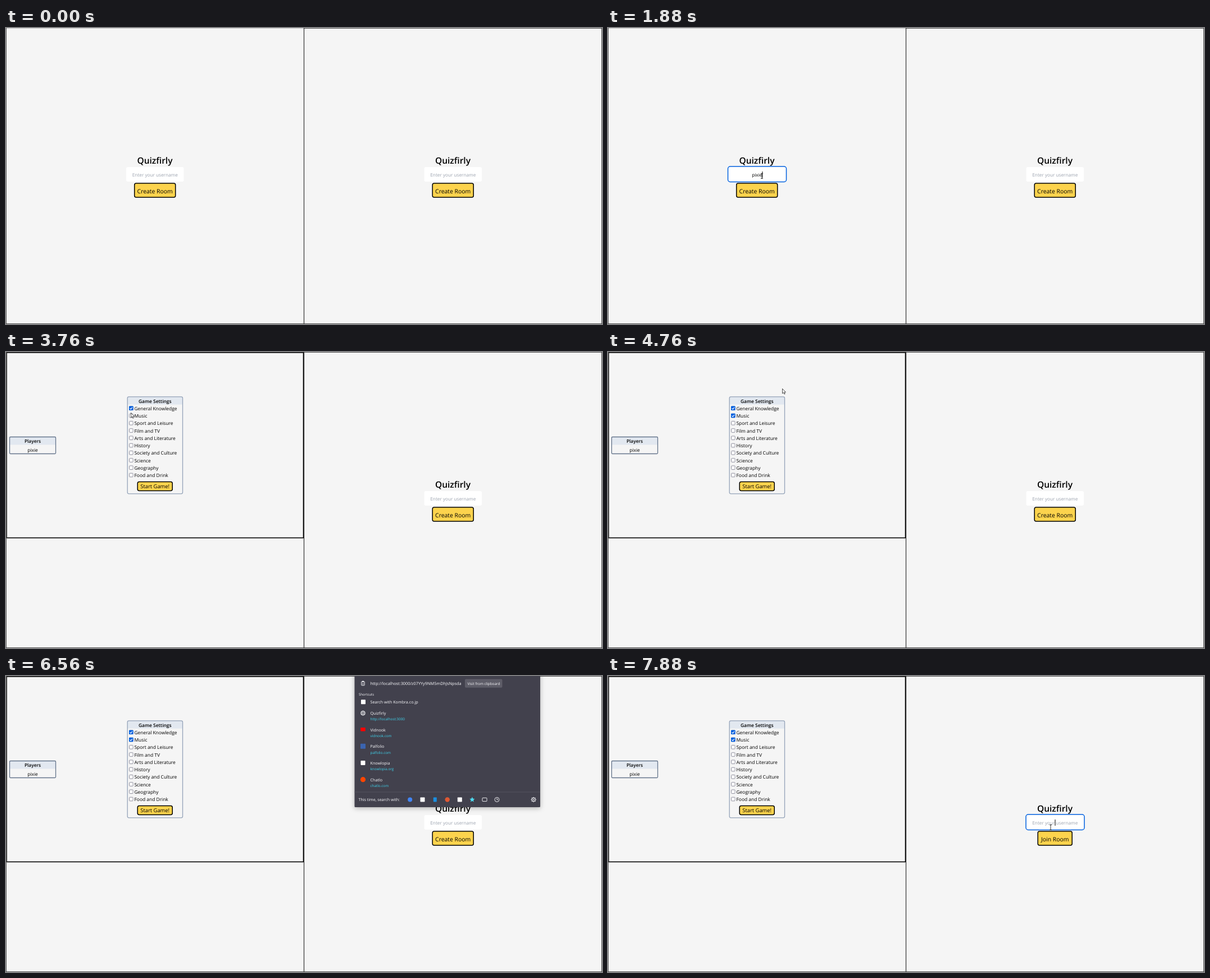
An HTML page that plays this animation: 1061 by 528 pixels, repeating every 8 s.

```html
<!DOCTYPE html>
<html lang="en">
<head>
<meta charset="utf-8">
<title>Quiz room</title>
<style>
html, body { margin: 0; width: 100%; height: 100%; overflow: hidden; background: #f5f5f5; }
svg { display: block; position: absolute; left: 0; top: 0; }
text { font-family: "Open Sans", "Noto Sans", sans-serif; text-rendering: geometricPrecision; white-space: pre; }
</style>
</head>
<body>
<svg id="stage" width="1061" height="528" viewBox="0 0 1061 528" xmlns="http://www.w3.org/2000/svg"></svg>
<script>
const LOOP = 8000, STEP = 40;
const TITLE = 'Quizfirly', USER = 'pixie';
const INK = '#000', BLUE = '#0060df', YELLOW = '#fcd34d';
const stage = document.getElementById('stage');

function add(parent, tag, attrs = {}, content) {
  const el = document.createElementNS(stage.namespaceURI, tag);
  for (const key in attrs) el.setAttribute(key, attrs[key]);
  if (content !== undefined) el.textContent = content;
  parent.append(el);
  return el;
}
const group = (parent, x = 0, y = 0) => add(parent, 'g', { transform: `translate(${x} ${y})` });
const rect = (p, x, y, width, height, fill, more) => add(p, 'rect', { x, y, width, height, fill, ...more });
const path = (p, d, stroke, width = 1, fill = 'none') =>
  add(p, 'path', { d, stroke, 'stroke-width': width, fill });
const label = (p, str, x, y, size, fill = INK, more) =>
  add(p, 'text', { x, y, 'font-size': size, fill, ...more }, str);
const centered = (p, str, x, y, size, fill, weight = 400) =>
  label(p, str, x, y, size, fill, { 'text-anchor': 'middle', 'font-weight': weight });
const show = (el, on) => el.setAttribute('visibility', on ? 'inherit' : 'hidden');

function button(p, str, cx, y, w, h, size, baseline) {
  const g = group(p);
  rect(g, cx - w / 2, y, w, h, YELLOW, { rx: 3, stroke: INK, 'stroke-width': 1.5 });
  centered(g, str, cx, baseline, size);
  return g;
}

// Login form, centred on x = 265
function loginForm(p, x) {
  const g = group(p, x);
  centered(g, TITLE, 265, 242, 15.5, INK, 600);
  rect(g, 214, 248, 102.5, 26, '#fff', { rx: 3 });
  const ring = rect(g, 213.5, 247, 104, 27.5, '#fff', { rx: 4, stroke: BLUE, 'stroke-width': 1.5 });
  const hint = centered(g, 'Enter your username', 265.3, 264.8, 8.22, '#9ca3af');
  const typed = centered(g, '', 265.3, 264.8, 8.25);
  const caret = rect(g, 265, 256, 1, 11, INK);
  const create = button(g, 'Create Room', 265.2, 277, 73, 25, 10.43, 294.5);
  const join = button(g, 'Join Room', 265.2, 277, 61, 25, 10.43, 294.5);
  return { g, ring, hint, typed, caret, create, join };
}

function roomView(p) {
  const g = group(p);
  rect(g, 1, 1, 528.5, 330.5, 'none', { stroke: INK, 'stroke-width': 1.6 });

  rect(g, 6.5, 151.5, 82, 30, '#f5f5f5', { rx: 1.5 });
  rect(g, 7, 152, 81, 13.5, '#e2e8f0');
  rect(g, 6.5, 151.5, 82, 30, 'none', { rx: 1.5, stroke: '#64748b', 'stroke-width': 1.3 });
  centered(g, 'Players', 47.5, 162.4, 8.3, INK, 600);
  centered(g, USER, 47.5, 177.7, 8.4);

  rect(g, 216.5, 80, 98, 13.7, '#e2e8f0');
  rect(g, 216.2, 79.8, 98.3, 173, 'none', { rx: 2.5, stroke: '#94a3b8', 'stroke-width': 1.3 });
  centered(g, 'Game Settings', 265.3, 90.5, 8.45, INK, 600);
  const topics = ['General Knowledge', 'Music', 'Sport and Leisure', 'Film and TV', 'Arts and Literature',
    'History', 'Society and Culture', 'Science', 'Geography', 'Food and Drink'];
  const ticks = topics.map((topic, i) => {
    const y = 13.25 * i;
    label(g, topic, 228.5, 103.8 + y, 8.42);
    rect(g, 219.5, 97 + y, 6.6, 6.6, '#fff', { rx: 1, stroke: '#8f8f9d' });
    const tick = group(g, 219, 96.5 + y);
    rect(tick, 0, 0, 7.6, 7.6, BLUE, { rx: 1 });
    path(tick, 'M1.6 4 L3.2 5.6 L6.1 2.1', '#fff', 1.1);
    return tick;
  });
  button(g, 'Start Game!', 265.2, 231.5, 62, 16, 9.4, 242.8);
  return { g, ticks };
}

const square = (p, x, y, fill, w = 8, h = w) => rect(p, x - w / 2, y - h / 2, w, h, fill, { rx: 0.8 });
const dot = (p, cx, cy, fill, r = 4.2) => add(p, 'circle', { cx, cy, r, fill });
const hoop = (p, cx, cy, r, stroke) => add(p, 'circle', { cx, cy, r, stroke, fill: 'none', 'stroke-width': 0.9 });

function star(p, x, y, fill) {
  const points = Array.from({ length: 10 }, (_, i) => {
    const r = i % 2 ? 2.3 : 4.8, a = (i - 2.5) * Math.PI / 5;
    return [x + r * Math.cos(a), y + r * Math.sin(a)].map(n => n.toFixed(2)).join();
  });
  add(p, 'polygon', { points: points.join(' '), fill });
}

function gear(p, x, y, ink) {
  hoop(p, x, y, 3.2, ink);
  hoop(p, x, y, 1.2, ink);
  for (let a = 0; a < 360; a += 45)
    add(p, 'line', { x1: x, x2: x, y1: y - 4.5, y2: y - 3.2, stroke: ink, 'stroke-width': 1.5,
      transform: `rotate(${a} ${x} ${y})` });
}

// Shared part of the address bar's list, in both colour themes
function suggestions(p, c) {
  label(p, 'Search with Kombra.co.jp', 118, 16.2, 7.2, c.ink);
  square(p, 105.5, 13, c.mark);
  const sites = [
    [TITLE, 'http://localhost:3000'],
    ['Vidnook', 'vidnook.com'],
    ['Palfolio', 'palfolio.com'],
    ['Knowlopia', 'knowlopia.org'],
    ['Chatlo', 'chatlo.com']
  ];
  sites.forEach(([name, url], i) => {
    label(p, name, 118, 36 + 29.65 * i, 7.2, c.ink);
    label(p, url, 118, 46.2 + 29.6 * i, 6.35, c.link);
  });
  hoop(p, 105, 33, 3.9, c.icon);
  add(p, 'ellipse', { cx: 105, cy: 33, rx: 1.7, ry: 3.9, fill: 'none', stroke: c.icon, 'stroke-width': 0.7 });
  path(p, 'M101.3 31.6H108.7 M101.3 34.4H108.7', c.icon, 0.7);
  square(p, 105, 62, '#f00', 8.5, 6.5);
  square(p, 105, 92, '#3b64b0', 9);
  square(p, 105, 121.7, c.mark);
  dot(p, 105, 151.5, '#ff4500', 4.6);

  path(p, 'M90 173.8H420.5', c.rule);
  label(p, 'This time, search with:', 97, 190.2, 7.1, c.note);
  dot(p, 188.7, 187.3, '#4285f4', 4);
  square(p, 211, 187.3, c.mark);
  square(p, 233.3, 187.3, '#1b8fe0', 6, 8);
  dot(p, 255.2, 187.3, '#de5833');
  square(p, 277.3, 187.3, c.mark);
  star(p, 299.4, 187.3, c.star);
  rect(p, 317.5, 184.2, 8, 6.2, 'none', { rx: 0.8, stroke: c.icon, 'stroke-width': 0.9 });
  hoop(p, 343.5, 187.3, 4, c.icon);
  path(p, 'M343.5 184.8V187.5H345.6', c.icon, 0.9);
  gear(p, 408.7, 187.3, c.icon);
}

function panel(p, x, w, h, fill) {
  const g = group(p);
  rect(g, x, -6, w, h + 6, fill, { rx: 1.5, style: 'filter:drop-shadow(0 2px 4px rgba(0,0,0,.28))' });
  return g;
}

function lightList(p) {
  const g = panel(p, 90, 330.5, 200, '#fff');
  suggestions(g, { ink: '#15141a', link: BLUE, icon: '#3f3e48', mark: '#222', rule: '#e8e8ec',
    note: '#73737c', star: BLUE });
  return g;
}

function darkList(p) {
  const g = panel(p, 620.5, 330.5, 234, '#42414d'), ink = '#fbfbfe';
  rect(g, 632.7, 9.8, 5.6, 7, 'none', { rx: 0.8, stroke: ink, 'stroke-width': 0.9 });
  rect(g, 634, 8.8, 3, 2, ink);
  path(g, 'M634 13H637 M634 15H637', ink, 0.7);
  label(g, 'http://localhost:3000/z07YYy9NM5mDhJsNpsda', 648.5, 16, 7.33, ink);
  rect(g, 817, 5.5, 66.5, 15.3, '#5e5d68', { rx: 2 });
  centered(g, 'Visit from clipboard', 850.4, 15.6, 6.4, ink);
  label(g, 'Shortcuts', 628, 34.8, 6.1, ink);
  suggestions(group(g, 530.5, 33.2), { ink, link: '#3fd5ee', icon: ink, mark: '#fff', rule: '#53525e',
    note: ink, star: '#4fdcf2' });
  return g;
}

// Stage
const left = loginForm(stage, 0), right = loginForm(stage, 530.5);
path(stage, 'M0 .5H530', '#c4c4c4');
const room = roomView(stage);
path(stage, 'M.5 0V528', '#5a5a5a');
path(stage, 'M530 .5H1061 M1060.5 0V528 M0 527.5H1061', '#4a4a4a');
path(stage, 'M530.5 0V528', '#333', 1.2);
const light = lightList(stage), dark = darkList(stage);

const arrow = group(stage), beam = group(stage);
path(arrow, 'M.5 .5V9L2.5 7.2L3.9 10.2L5.2 9.6L3.9 6.7H6.4Z', '#222', 0.8, '#fff');
path(beam, 'M-2 -4.5H2 M-2 4.5H2 M0 -4.5V4.5', '#222', 0.9);

// Pointer runs: [time, x, y]
const runs = [
  [[40, 300, 524], [400, 277, 261], [600, 274, 264], [2200, 274, 264], [2480, 264, 290], [2840, 261, 295],
    [3040, 259, 290], [3360, 222, 99], [3680, 222, 99], [3880, 222, 113], [4000, 222, 113],
    [4360, 262, 228], [4560, 262, 228], [4760, 310, 65], [4880, 332, -14]],
  [[6040, 456, 0], [6160, 560, 12], [6300, 700, -14]],
  [[6640, 800, -12], [6880, 846, 12], [7240, 846, 12], [7600, 792, 256], [7720, 788, 270], [8000, 788, 270]]
];
const ease = u => u * (2 - u);

function pointerAt(t) {
  const run = runs.find(r => t >= r[0][0] && t <= r[r.length - 1][0]);
  if (!run) return null;
  const i = Math.max(1, run.findIndex(k => k[0] >= t));
  const [t0, x0, y0] = run[i - 1], [t1, x1, y1] = run[i];
  const u = ease((t - t0) / (t1 - t0));
  return [x0 + (x1 - x0) * u, y0 + (y1 - y0) * u];
}

const keyTimes = [1200, 1480, 1600, 1720, 1880];
const within = (t, a, b) => t >= a && t < b;

function render(t) {
  const inRoom = t >= 2640;
  show(left.g, !inRoom);
  show(room.g, inRoom);
  show(left.join, false);
  if (!inRoom) {
    const str = USER.slice(0, keyTimes.filter(k => t >= k).length);
    left.typed.textContent = str;
    show(left.ring, t >= 400);
    show(left.hint, !str);
    show(left.caret, within(t, 400, 920) || t >= 1200);
    left.caret.setAttribute('x', str ? 265.3 + left.typed.getComputedTextLength() / 2 : 265);
  } else {
    for (const part of [left.ring, left.hint, left.caret, left.create]) part.setAttribute('visibility', 'hidden');
    left.typed.textContent = '';
  }
  if (!inRoom) show(left.create, true);
  room.ticks.forEach((tick, i) => show(tick, inRoom && t >= [3360, 3920][i]));

  show(light, within(t, 4960, 6320));
  show(dark, within(t, 6560, 7200));
  show(right.g, !within(t, 7240, 7320));
  const joining = t >= 7320;
  show(right.create, !joining);
  show(right.join, joining);
  show(right.ring, t >= 7880);
  show(right.caret, t >= 7880);

  const spot = pointerAt(t);
  const overInput = spot && within(spot[1], 248, 274) &&
    (!inRoom && within(spot[0], 214, 317) || joining && within(spot[0], 744, 847));
  show(arrow, spot && !overInput);
  show(beam, overInput);
  if (spot) for (const el of [arrow, beam])
    el.setAttribute('transform', `translate(${spot[0].toFixed(1)} ${spot[1].toFixed(1)})`);
}

const start = performance.now();
function tick() {
  const t = (performance.now() - start) % LOOP;
  render(Math.floor(t / STEP) * STEP);
  requestAnimationFrame(tick);
}
tick();
</script>
</body>
</html>
```
